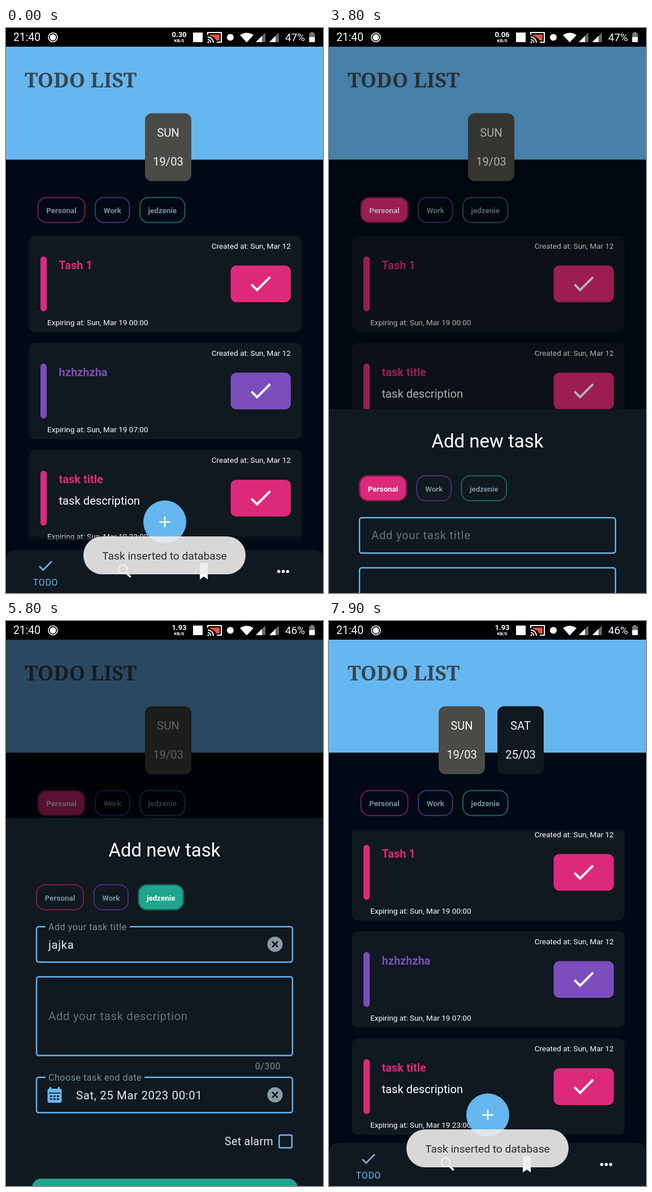
An HTML page that plays this animation: 561 px wide and 998 px high, repeating every 8000 ms.

```html
<!DOCTYPE html>
<html lang="en">
<head>
<meta charset="utf-8">
<title>Todo list</title>
<style>
html, body { margin: 0; width: 100%; height: 100%; overflow: hidden; background: #010a14; }
svg { display: block; width: 561px; height: 998px; font-family: Roboto, "Noto Sans", sans-serif; }
text { white-space: pre; }
</style>
</head>
<body>
<svg id="stage" viewBox="0 0 561 998"></svg>
<script>
const LOOP = 8000, STEP = 100;
const BG = '#010a14', PANEL = '#101820', BLUE = '#66b7f0', GREY = '#78909c';
const PINK = '#dd2a78', VIOLET = '#7c4dbd', TEAL = '#1fa68d';

// Tracks: [time, value]; "hold" jumps, "glide" interpolates.
const hold = {
  speed: [[0, '0.30'], [3300, '0.06'], [4600, '0.12'], [5800, '1.93']],
  battery: [[0, 47], [4800, 46]],
  filter: [[0, -1], [800, 0], [1300, 1], [3000, 0], [6000, -1]],
  tasks: [[0, [0, 1, 2]], [800, [0, 2]], [1300, [1]], [3000, [0, 2]], [6400, [0, 1, 2]]],
  days: [[0, 1], [6500, 2]],
  typed: [[0, ''], [4200, 'js'], [4300, 'jsjs'], [4400, 'jsjsj'], [4500, 'jsj'], [4600, 'ja'], [4700, 'jajka']],
  focus: [[0, false], [4000, true], [4800, false]],
  category: [[0, 0], [4800, 2]],
  picked: [[0, 12], [5200, 25]],
  press: [[0, false], [5400, true]],
  due: [[0, ''], [5600, 'Sat, 25 Mar 2023 00:01']]
};
const glide = {
  toast: [[2000, 1], [2300, 0], [6000, 0], [6100, .12], [6200, .6], [6300, 1]],
  scrim: [[3700, 0], [3900, .6], [5900, .6], [6100, .07], [6200, 0]],
  sheetY: [[3700, 650], [3900, 0], [5900, 0], [6100, 69], [6200, 100]],
  sheetA: [[3699, 0], [3700, 1], [5900, 1], [6100, .22], [6200, 0]],
  keys: [[4000, 0], [4200, 1], [4700, 1], [4900, 0]],
  dialog: [[4900, 0], [5000, 1], [5400, 1], [5500, 0]],
  scroll: [[7600, 0], [7900, 8]]
};

function held(track, t) {
  let v = track[0][1];
  for (const [at, next] of track) if (t >= at) v = next;
  return v;
}
function glided(track, t) {
  if (t <= track[0][0]) return track[0][1];
  for (let i = 1; i < track.length; i++) {
    const [a, va] = track[i - 1], [b, vb] = track[i];
    if (t <= b) return va + (vb - va) * (t - a) / (b - a);
  }
  return track[track.length - 1][1];
}
function stateAt(t) {
  const s = {};
  for (const k in hold) s[k] = held(hold[k], t);
  for (const k in glide) s[k] = glided(glide[k], t);
  return s;
}

// Drawing helpers
const rect = (x, y, w, h, r, fill, more = '') =>
  `<rect x="${x}" y="${y}" width="${w}" height="${h}" rx="${r}" fill="${fill}" ${more}/>`;
const circle = (x, y, r, fill, more = '') => `<circle cx="${x}" cy="${y}" r="${r}" fill="${fill}" ${more}/>`;
const path = (d, fill, more = '') => `<path d="${d}" fill="${fill}" ${more}/>`;
const line = (d, color, w, more = '') => path(d, 'none', `stroke="${color}" stroke-width="${w}" ${more}`);
const group = (inner, more) => `<g ${more}>${inner}</g>`;
const move = (x, y, inner) => group(inner, `transform="translate(${x} ${y})"`);
const text = (x, y, str, size, fill = '#fff', more = '') =>
  `<text x="${x}" y="${y}" font-size="${size}" fill="${fill}" ${more}>${str.replace('&', '&amp;')}</text>`;
const MID = 'text-anchor="middle" ', END = 'text-anchor="end" ';
const BOLD = 'font-weight="700" ', MEDIUM = 'font-weight="500" ';
const CHECK = 'M9 16.17 4.83 12l-1.42 1.41L9 19 21 7l-1.41-1.41z';
const tick = (x, y, k, fill) => path(CHECK, fill, `transform="translate(${x} ${y}) scale(${k})"`);

function statusBar(s) {
  const bars = x => path(`M${x} 25h17v-17z`, '#666') + path(`M${x} 25h11v-11z`, '#fff');
  return rect(0, 0, 561, 33, 0, '#000') +
    text(13, 23, '21:40', 19.3) +
    circle(83, 16.5, 8, 'none', 'stroke="#fff" stroke-width="1.6"') + circle(83, 16.5, 5.5, '#fff') +
    text(306.5, 16, s.speed, 13, '#fff', MID + BOLD) + text(306.5, 25, 'KB/S', 8, '#fff', MID + BOLD) +
    rect(331, 8, 17, 17, 1, '#fff') +
    line('M357 12v-4h24v17h-8', '#fff', 2) + path('M361 11.500h17v10.500h-6q-3-7-11-8z', '#e8553c') +
    line('M357 16a10 10 0 0 1 10 10M357 20.500a5.500 5.500 0 0 1 5.500 5.500', '#fff', 1.8) + circle(358, 25, 1.6, '#fff') +
    circle(397, 16.5, 6, '#fff') +
    path('M414 12.500Q426 4.500 438 12.500L426 25.500z', '#fff') + bars(442) + bars(466) +
    text(494, 23, s.battery + '%', 19, '#fff') +
    rect(539, 7, 5, 3, 0, '#777') + rect(536.5, 9, 10, 16, 1, '#777') + rect(536.5, 16, 10, 9, 1, '#fff');
}

const CHIPS = [
  ['Personal', 56.5, 83, PINK, '#7d1c4b'],
  ['Work', 158, 60.5, VIOLET, '#4a2f74'],
  ['jedzenie', 237, 79.5, TEAL, '#17665a']
];
const chips = selected => CHIPS.map(([name, x, w, color, dim], i) => {
  const on = i === selected;
  return rect(x, 0, w, 44, 15, on ? color : 'none', `stroke="${dim}" stroke-width="${on ? 2.6 : 2}"`) +
    text(x + w / 2, 27.5, name, 13.4, on ? '#fff' : GREY, MID + BOLD);
}).join('');

const TASKS = [
  ['Tash 1', '', '00:00', PINK],
  ['hzhzhzha', '', '07:00', VIOLET],
  ['task title', 'task description', '23:00', PINK]
];
const card = ([title, note, hour, color], y) => move(0, y,
  rect(40.5, 0, 482.5, 170, 10, PANEL) +
  text(504, 22.5, 'Created at: Sun, Mar 12', 13.55, '#fff', END) +
  rect(61, 36.5, 11, 97, 5.5, color) +
  text(93.5, 58.5, title, 20, color, BOLD) + text(93.5, 97, note, 20.2) +
  rect(397.5, 54, 106.5, 65, 10, '#000', 'opacity=".3"') +
  rect(397.5, 52.5, 106.5, 65, 10, color) + tick(426, 60, 2.04, '#fff') +
  text(73, 158, `Expiring at: Sun, Mar 19 ${hour}`, 13.55));

const day = (x, name, date, fill) =>
  rect(x, 0, 82, 120, 12, fill) + text(x + 41, 41.5, name, 20.2, '#f5f5f5', MID) +
  text(x + 41, 92.5, date, 20.2, '#f5f5f5', MID);

function home(s) {
  const k = s.keys;
  const list = s.tasks.map((n, i) => card(TASKS[n], 367 + i * 189.2 - s.scroll)).join('');
  const more = s.tasks.length > 2 ? (8 - s.scroll) / 8 : 0;
  const days = s.days > 1
    ? day(194, 'SUN', '19/03', '#4a4a46') + day(298, 'SAT', '25/03', PANEL)
    : day(246, 'SUN', '19/03', '#4a4a46');
  return rect(0, 0, 561, 998, 0, BG) + rect(0, 33, 561, 199.5 - 80 * k, 0, BLUE) +
    text(33, 105, 'TODO LIST', 36, '#37474f', BOLD + 'font-family="Noto Serif, serif"') +
    move(0, 150.5 - 96 * k, days) +
    move(0, 299.5 - 116 * k, chips(s.filter)) +
    move(0, -131.500 * k, group(list, 'clip-path="url(#list)"') +
      rect(0, 895, 561, 13, 0, 'url(#low)', `opacity="${more}"`) +
      rect(0, 366, 561, 8, 0, 'url(#high)', `opacity="${s.scroll / 8}"`)) +
    path('M0 998V940Q0 922 18 922H543Q561 922 561 940V998z', '#111920') +
    tick(53.4, 933.4, 1.36, BLUE) + text(70, 985, 'TODO', 16, BLUE, MID + 'letter-spacing=".7"') +
    circle(206.500, 956, 7.6, 'none', 'stroke="#fff" stroke-width="2.7"') + line('M211.500 961l9 9', '#fff', 3.2) +
    path('M343 974V948q0-3 3-3h8q3 0 3 3v26l-7-5z', '#fff') +
    [482.7, 490.6, 498.5].map(x => circle(x, 960, 2.8, '#fff')).join('') +
    circle(281, 872.5, 38, BLUE) + line('M271.500 872.500h19M281 863v19', '#fff', 2.5);
}

const LS = 'letter-spacing=".55"';
function field(y, h, label, float, notch, focus) {
  return rect(54, y, 453, h, 4, 'none', `stroke="${BLUE}" stroke-width="${focus ? 2.8 : 2.4}"`) +
    (float ? rect(70, y - 4, notch, 8, 0, PANEL) + text(75, y + 6, label, 16, focus ? BLUE : GREY, LS)
           : text(75, y + 38, label, 20.4, '#5f7480', 'letter-spacing=".64"'));
}
const clear = y => circle(476, y, 13.5, '#8a9ba5') + line(`M471 ${y - 5}l10 10m0-10l-10 10`, PANEL, 2.6);
const value = (x, y, str) => text(x, y, str, 20.4, '#e8ecef', 'letter-spacing=".64"');

function calendarIcon() {
  let dots = '';
  for (let i = 0; i < 6; i++) dots += rect(78 + 6 * (i % 3), 838 + 5 * (i / 3 | 0), 3.5, 3, 0, PANEL);
  return rect(73.5, 826, 25, 25, 3, BLUE) + rect(77, 823, 3, 5, 0, BLUE) + rect(92, 823, 3, 5, 0, BLUE) +
    rect(76, 833, 20, 1.6, 0, PANEL) + dots;
}

function sheet(s) {
  const open = s.focus || s.typed;
  const wide = 75 + [...s.typed].reduce((w, c) => w + (c === 's' ? 11.2 : c === 'j' ? 5.5 : 11.3), 0);
  const caret = s.focus
    ? (s.typed ? line(`M75 582H${wide}`, '#fff', 1.3) : '') + rect(wide, 557, 2, 29, 0, '#fff') : '';
  return rect(0, 348, 561, 750, 0, PANEL) +
    text(280.5, 416, 'Add new task', 33, '#fff', MID) +
    move(-2.5, 466, chips(s.category)) +
    field(540, 62.5, 'Add your task title', open, 149, s.focus) + value(75, 579, s.typed) + caret +
    (s.typed ? clear(571) : '') +
    field(628.5, 139, '', false, 0, false) +
    text(75, 705, 'Add your task description', 20.4, '#5f7480', 'letter-spacing=".64"') +
    text(486, 792, '0/300', 16, GREY, END + LS) +
    field(806, 62.5, 'Choose task end date', true, 175, false) + calendarIcon() +
    value(124, 844.5, s.due) + (s.due ? clear(837) : '') +
    text(473, 926, 'Set alarm', 19.6, '#e8ecef', END + 'letter-spacing=".3"') +
    rect(483.5, 908, 22.5, 22.5, 2, 'none', `stroke="${BLUE}" stroke-width="2.6"`) +
    rect(46, 985, 470, 60, 16, TEAL);
}

const ROWS = [
  ['qwertyuiop', '1234567890', 6.5, 682],
  ['asdfghjkl', '@#$_&-+()', 34.5, 762],
  ['zxcvbnm', '*"\':;!?', 89.5, 842]
];
function keyboard(s) {
  const key = (x, y, w, fill) => rect(x, y + 1.5, w, 63, 7, '#0a0b09') + rect(x, y, w, 63.5, 7, fill);
  const dark = '#272927', light = '#575957', ink = '#e4e6e4';
  let out = rect(0, 610, 561, 388, 0, '#121410');
  for (const [letters, hints, x0, y] of ROWS) {
    [...letters].forEach((c, i) => {
      const x = x0 + 55.5 * i;
      out += key(x, y, 48, light) + text(x + 24, y + 44, c, 36, '#fff', MID) +
        text(x + 45, y + 15.5, hints[i], 14, '#d4d6d4', END + MEDIUM);
    });
  }
  out += key(6.5, 842, 75.5, dark) + key(479, 842, 75.5, dark) + key(6.5, 922.5, 75.5, dark) +
    key(89.5, 922.5, 48, dark) + key(145, 922.5, 270.5, light) + key(423, 922.5, 48, dark) +
    key(479, 922.5, 75.5, '#02415d') +
    line('M44 861l14 14h-7v12h-14v-12h-7z', ink, 2.4) +
    line('M508 863h24v25h-24l-8-12.500zM512 870.500l10 10m0-10l-10 10', ink, 2.4) +
    text(44, 964, '?123', 24, ink, MID + MEDIUM) +
    text(113.5, 971, ',', 27, ink, MID) + text(447, 971, '.', 27, ink, MID) +
    circle(113.5, 942, 6.5, 'none', `stroke="${ink}" stroke-width="1.3"`) +
    circle(111, 940, 1, ink) + circle(116, 940, 1, ink) + line('M110 944q3.500 3.500 7 0', ink, 1.2) +
    text(280.5, 962, 'PL • EN', 17.5, '#fff', MID) +
    line('M528 947v9h-24m7-7l-7 7l7 7', '#fff', 2.8) +
    circle(31, 640, 20.5, '#fff') + line('M28 633l7 7l-7 7', '#333', 2.3) +
    text(129, 650, s.typed, 25.5, '#b4b6b4', MID) + text(280, 650, 'jak', 25, '#fff', MID + BOLD) +
    line('M200 624v33M359 624v33', '#30332f', 1.5) +
    circle(431, 640.5, 13.5, '#fbc433') + circle(423, 645, 4, '#f08a5a') + circle(439, 645, 4, '#f08a5a') +
    [425.5, 436.5].map(x => circle(x, 638, 4.6, '#fff') + circle(x, 638, 2, '#4b3420')).join('') +
    line('M428 649h6', '#7a4a20', 1.8) +
    rect(525.5, 628, 8.5, 15, 4.2, '#c6c8c6') + line('M521.500 638a8.300 8.300 0 0 0 16.600 0M529.800 646v7', '#c6c8c6', 2.2);
  return move(0, 388 * (1 - s.keys), out);
}

function picker(s) {
  const colX = c => 82.5 + 65.95 * c;
  let days = '';
  ['Mon', 'Tue', 'Wed', 'Thu', 'Fri', 'Sat', 'Sun'].forEach((d, c) => {
    days += text(colX(c), 425, d, 18, c > 4 ? BLUE : '#3c6a8d', MID + MEDIUM);
  });
  for (let d = 1; d <= 31; d++) {
    const c = (d + 1) % 7, y = 461 + 44.7 * Math.floor((d + 1) / 7), on = d === s.picked;
    const ink = on || d > 12 ? '#fff' : d === 12 ? BLUE : '#676d72';
    days += (on ? circle(colX(c), y, 20.5, BLUE) : '') + text(colX(c), y + 6.5, String(d), 18, ink, MID);
  }
  return rect(28, 225, 505, 580, 14, PANEL) + rect(39, 236, 483, 67.5, 10, BLUE) +
    text(280.5, 261, 'Selected Day', 16.5, '#9ab4c2', MID) +
    text(280.5, 289, `2023/03/${s.picked}`, 20.3, '#fff', MID + MEDIUM) +
    text(281, 373, 'March 2023', 27.3, BLUE, MID + MEDIUM) + days +
    rect(28, 684, 505, 1, 0, '#7d8785') +
    (s.press ? path('M426 742h44q10 12 10 25t-10 25h-44q-8 0-8-8v-34q0-8 8-8z', '#2a313a') : '') +
    text(63, 774, 'TODAY', 20, '#fff', MEDIUM) +
    text(359, 774, 'CANCEL', 20, '#e0405a', MID + MEDIUM) +
    text(465, 774, 'SELECT', 20, '#4cb47e', MID + MEDIUM);
}

const toast = () => rect(137, 898, 287, 67, 33, '#eeeeee', 'opacity=".9"') +
  text(280.5, 939, 'Task inserted to database', 19.2, '#2a2c2f', MID);

const shade = a => a > 0 ? rect(0, 33, 561, 965, 0, '#000', `opacity="${a}"`) : '';
const fade = (id, from, to) => `<linearGradient id="${id}" x1="0" y1="0" x2="0" y2="1">` +
  `<stop offset="0" stop-color="${BG}" stop-opacity="${from}"/>` +
  `<stop offset="1" stop-color="${BG}" stop-opacity="${to}"/></linearGradient>`;
const DEFS = `<defs><clipPath id="list">${rect(0, 366, 561, 541.5, 0, '#000')}</clipPath>` +
  fade('low', 0, 1) + fade('high', 1, 0) + '</defs>';

function scene(s) {
  let out = DEFS + home(s) + shade(s.scrim * (1 - s.dialog));
  if (s.sheetA > 0) out += group(sheet(s), `transform="translate(0 ${s.sheetY})" opacity="${s.sheetA}"`);
  if (s.keys > 0) out += keyboard(s);
  out += shade(.6 * s.dialog);
  if (s.dialog > 0) out += group(picker(s), `opacity="${s.dialog}"`);
  if (s.toast > 0) out += group(toast(), `opacity="${s.toast}"`);
  return out + statusBar(s);
}

const stage = document.getElementById('stage');
const start = performance.now();
let shown = -1;
function play() {
  const t = Math.floor((performance.now() - start) % LOOP / STEP) * STEP;
  if (t !== shown) {
    shown = t;
    stage.innerHTML = scene(stateAt(t));
  }
  requestAnimationFrame(play);
}
play();
</script>
</body>
</html>
```
